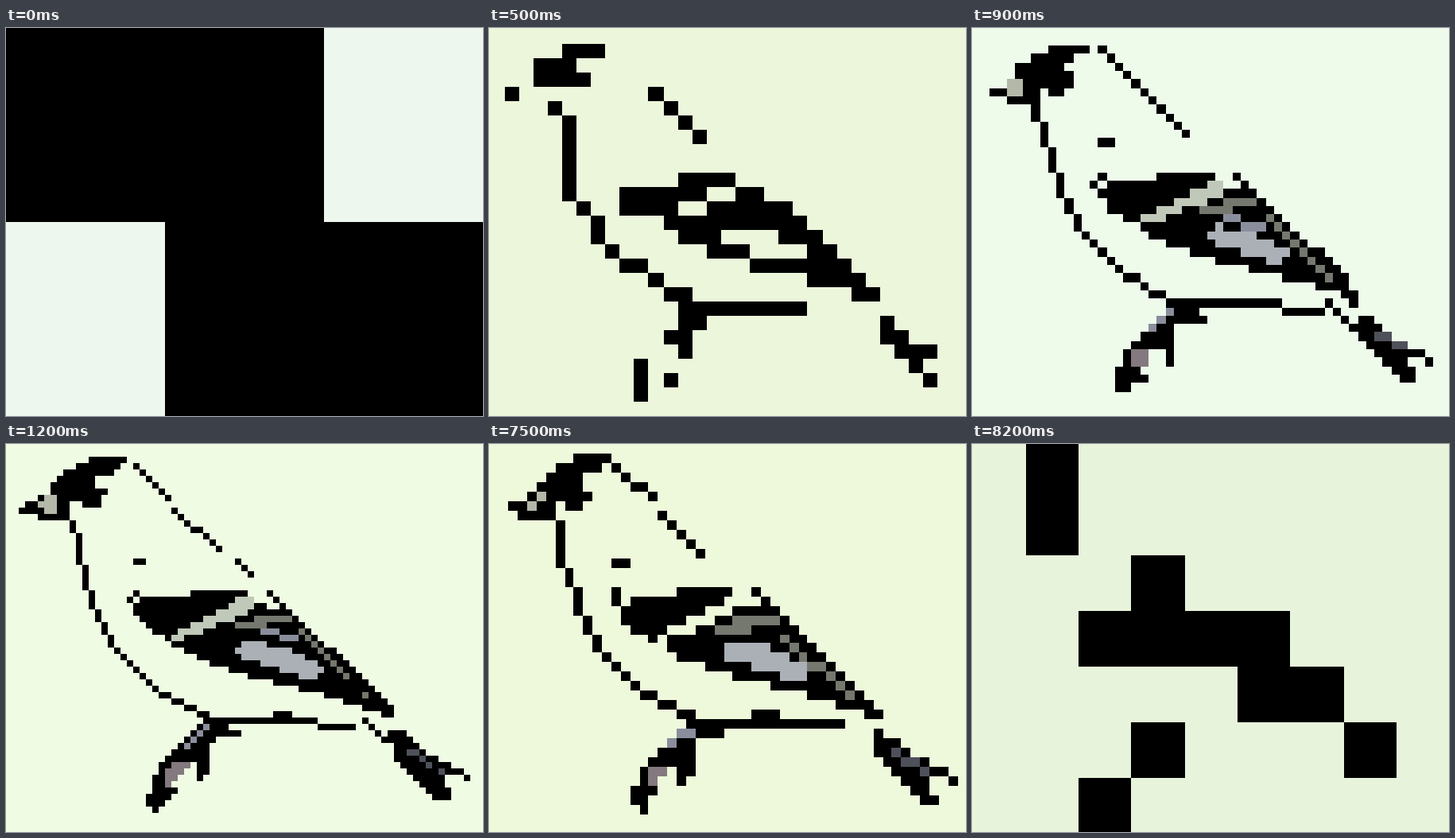
These frames come from a looping animation (600 px wide and 488 px high, 8300 ms). An HTML page with a canvas:

```html
<!DOCTYPE html>
<html lang="en">
<head>
<meta charset="utf-8">
<title>Pixel bird</title>
<style>
  html, body { margin: 0; width: 600px; height: 488px; overflow: hidden; }
  canvas { display: block; }
</style>
</head>
<body>
<canvas id="stage" width="600" height="488"></canvas>
<script>
const W = 600, H = 488, COLS = 75, ROWS = 61;
const LOOP = 8300, STEP = 100, TOP = 12, HOLD_END = 7200;
const INK = '#000', GREY = '#74786e', BLUE = '#8a8e9c';
const ctx = document.getElementById('stage').getContext('2d');

// Shapes live on the finest grid; min is the column count from which they show.
const shapes = [];
const parse = s => s.split(' ').map(p => p.split(',').map(Number));
const fill = (pts, color = INK, min = 0) => shapes.push({ pts: parse(pts), color, min, solid: true });
const light = (pts, color, from) => shapes.push({ pts: parse(pts), color, min: 0, from, solid: true });
const line = (pts, min = 0, color = INK, keep = 1) => shapes.push({ pts: parse(pts), min, color, keep });

function curve(pts, steps = 8) {
  const [a, b, c] = parse(pts);
  const at = (t, k) => (1 - t) ** 2 * a[k] + 2 * t * (1 - t) * b[k] + t * t * c[k];
  const path = Array.from({ length: steps + 1 }, (_, i) => [at(i / steps, 0), at(i / steps, 1)]);
  shapes.push({ pts: path, color: INK, min: 0, keep: 1 });
}

// head and beak
fill('13.4,2 19.5,2 16,5 14,5.6 14,7 16,7 15,10 12,10 12,9 7,9 7,6');
fill('1.5,11 5.5,8 10,8 10,11 9,12 5,12 5,11');
light('7,8 9,8 8,9 8,11 6,11 5,9', '#b3b8a8', 51);

// breast, nape and cheek
line('9,11 10,13 11,15 11,16');
curve('11,16 13,35 31,42');
line('20,3 25,8', 45);
line('26,10 33,16');
line('36,18 38,20', 75);
line('20,18 21,18', 45);
line('19,24 20,23', 45);

// wing
fill('29,23 38,23 39,25 44,26 57,37 61,42 61,43 52,40 40,37 31,34 22,29 20,26 20,25 23,24 29,24');
line('41,23 56,38', 51);
line('57,39 60,42', 33);
light('26,31 26,30 34,26 37,24 39,24 39,26 30,30', '#c0c8b9', 57);
light('36,33 38,31 44,32 50,35 49,37 44,36', '#aab0b6', 51);
line('39,27 44,27', 51, GREY);
line('36,28 40,28', 51, GREY);
line('40,29 45,30', 57, BLUE);
line('45,28 56,39', 51, GREY, .7);

// belly and rump
line('33,43 48,43', 33);
line('42,42 44,42', 45);
line('49,44 54,44', 45);
line('34,45 36,45', 45);
line('56,43 59,46', 57);

// leg and foot
fill('31,43 35,43 35,45 32,47 32,52 30,53 30,50 29,50 26,54 29,55.5 26,55 24,58 22,56 24,51 28,47');
light('26,50 29,50 26,54 25,53', '#83797e', 51);
line('32,43 28,47', 51, BLUE, .7);

// tail
fill('60,45 62,45 66,48.5 73,52 73,53 68,51 70,55 70,56 68,56 61,49');
line('62,47 68,51', 51, '#4e515a', .6);

const rowsFor = cols => Math.round(cols * H / W);
const noise = n => { const v = Math.sin(n * 12.9898) * 43758.5453; return v - Math.floor(v); };

function inside(pts, x, y) {
  let hit = false;
  pts.forEach(([ax, ay], i) => {
    const [bx, by] = pts[(i + 1) % pts.length];
    if (ay > y !== by > y && x < ax + (y - ay) / (by - ay) * (bx - ax)) hit = !hit;
  });
  return hit;
}

function rasterize(cols, detail = cols) {
  const rows = rowsFor(cols), sx = cols / COLS, sy = rows / ROWS;
  const grid = Array.from({ length: rows }, () => Array(cols).fill(''));
  const cell = ([x, y]) => [Math.floor((x + .5) * sx), Math.floor((y + .5) * sy)];
  for (const { pts, color, min, solid, from, keep } of shapes) {
    if (min > detail) continue;
    if (solid) {
      const tint = from > detail ? '' : color;
      for (let y = 0; y < rows; y++)
        for (let x = 0; x < cols; x++)
          if (inside(pts, (x + .5) / sx, (y + .5) / sy)) grid[y][x] = tint;
      continue;
    }
    pts.slice(1).forEach((p, i) => {
      const [ax, ay] = cell(pts[i]), [bx, by] = cell(p);
      const n = Math.max(Math.abs(bx - ax), Math.abs(by - ay), 1);
      for (let j = 0; j <= n; j++)
        if (noise(j + 1) < keep)
          grid[Math.round(ay + (by - ay) * j / n)][Math.round(ax + (bx - ax) * j / n)] = color;
    });
  }
  return grid;
}

// Coarse grids turn black where enough of the fine grid is inked.
function shrink(cols) {
  const rows = rowsFor(cols), limit = .12 + .0055 * cols;
  const sums = Array.from({ length: rows }, () => Array.from({ length: cols }, () => [0, 0]));
  rasterize(COLS, cols).forEach((row, y) => row.forEach((c, x) => {
    const s = sums[Math.floor((y + .5) * rows / ROWS)][Math.floor((x + .5) * cols / COLS)];
    s[0] += c === INK;
    s[1]++;
  }));
  return sums.map(row => row.map(([ink, all]) => ink / all > limit ? INK : ''));
}

const grids = Array.from({ length: TOP + 1 }, (_, level) => {
  const cols = 3 + 6 * level;
  return cols < 30 ? shrink(cols) : rasterize(cols);
});

// Paper colour: level, then red, green, blue.
const stops = [[0, 237, 247, 237], [1, 231, 243, 218], [8, 238, 248, 219], [9, 238, 251, 235], [TOP, 239, 252, 227]];

function paper(level) {
  const i = Math.max(1, stops.findIndex(s => s[0] >= level));
  const [a, ...from] = stops[i - 1], [b, ...to] = stops[i];
  return `rgb(${from.map((v, k) => Math.round(v + (to[k] - v) * (level - a) / (b - a)))})`;
}

const edge = (i, n, size) => 2 * Math.ceil(i * size / 2 / n);

function draw(level) {
  const grid = grids[level], rows = grid.length, cols = grid[0].length;
  ctx.fillStyle = paper(level);
  ctx.fillRect(0, 0, W, H);
  grid.forEach((row, y) => row.forEach((color, x) => {
    if (!color) return;
    const l = edge(x, cols, W), t = edge(y, rows, H);
    ctx.fillStyle = color;
    ctx.fillRect(l, t, edge(x + 1, cols, W) - l, edge(y + 1, rows, H) - t);
  }));
}

function levelAt(t) {
  if (t < HOLD_END) return Math.min(TOP, Math.floor(t / STEP));
  return TOP - 1 - Math.floor((t - HOLD_END) / STEP);
}

let shown = -1;
const start = performance.now();
function tick() {
  const level = levelAt((performance.now() - start) % LOOP);
  if (level !== shown) draw(shown = level);
  requestAnimationFrame(tick);
}
tick();
</script>
</body>
</html>
```
